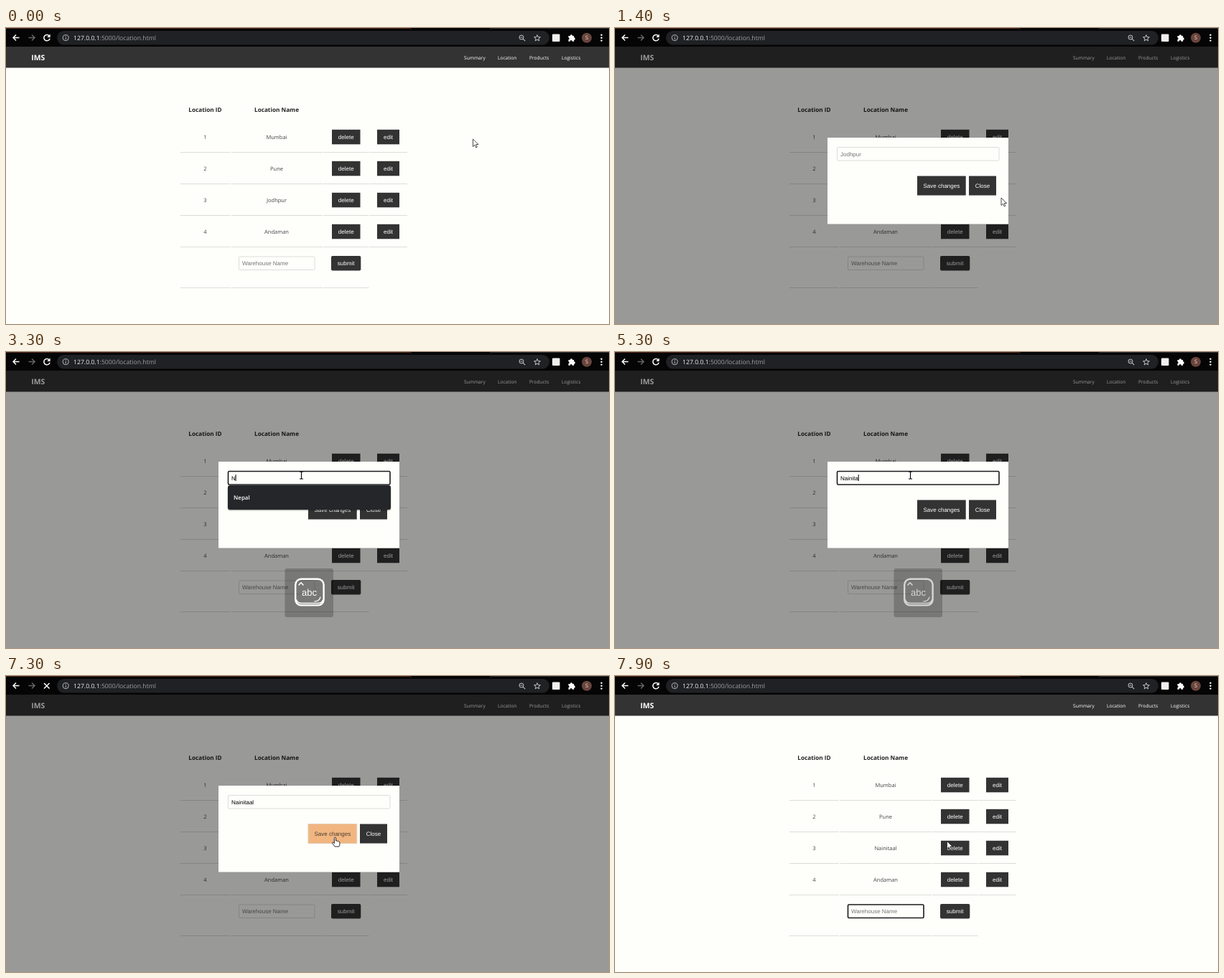
These frames come from a looping animation (840 px wide and 413 px high, 8 s). An HTML page:

```html
<!DOCTYPE html>
<html lang="en">
<head>
<meta charset="utf-8">
<title>Locations</title>
<style>
  html, body { margin: 0; width: 100%; height: 100%; overflow: hidden; background: #fefffb; }
  svg { display: block; width: 840px; height: 413px; }
  text { font-family: "Open Sans", "Noto Sans", sans-serif; text-rendering: geometricPrecision; }
  .ui { font-family: "Liberation Sans", Arial, sans-serif; font-size: 8px; }
  .mid { text-anchor: middle; }
  .cell { font-size: 7.5px; fill: #444; }
  .head { font-size: 8.2px; font-weight: 700; fill: #222; }
  .nav { font-size: 6.65px; fill: #fff; }
  .btn rect { fill: #333; }
  .btn text { fill: #fff; }
  .btn.hot rect { fill: #f1b680; stroke: #e6cdb2; stroke-width: 1; }
  .btn.hot text { fill: #4a3c30; }
  .field rect { fill: #fefffb; stroke: #dcdcd9; stroke-width: 1; }
  .field.focus rect { stroke: #1a1a1a; stroke-width: 1.6; }
  .hint { fill: #757575; }
  .line { fill: none; stroke: #fff; stroke-width: 1.5; }
</style>
</head>
<body>
<svg id="stage" viewBox="0 0 840 413">
  <g id="page"></g>
  <g id="dialog">
    <rect y="26" width="840" height="387" fill="#000" opacity=".4"/>
    <rect x="296" y="153" width="252" height="120.5" fill="#fefffb"/>
    <g id="dialogParts"></g>
    <rect id="caret" y="171" width="1" height="9" fill="#000"/>
    <g id="suggest">
      <rect x="308.5" y="187" width="228" height="34.5" rx="4" fill="#000" opacity=".25"/>
      <rect x="309" y="186" width="227" height="34" rx="3" fill="#242629"/>
      <text x="317" y="206" font-size="8" font-weight="600" fill="#fff">Nepal</text>
    </g>
  </g>
  <g id="caps">
    <rect x="388.5" y="302" width="67.5" height="68" rx="3" fill="#000" opacity=".22"/>
    <g id="capsIcon" fill="none" stroke="#fff" stroke-width="2.4" stroke-linecap="round">
      <rect x="403.2" y="316.8" width="39.4" height="36.6" rx="8"/>
      <path d="M404.5 346q1.500 4.500 7 4.500h23q6 0 7-4.500" stroke-width="1.600"/>
      <path d="M408 325l3-3.200 3 3.200" stroke-width="1.600"/>
      <path d="M429.500 348q7 0 8.500-6" stroke-width="1.200"/>
      <text class="ui mid" x="422.500" y="339.600" style="font-size:13px" fill="#fff" stroke="none">abc</text>
    </g>
  </g>
  <g id="bar">
    <rect width="840" height="26" fill="#050505"/>
    <path d="M0 .5H560q4 0 5 1.500" fill="none" stroke="#5b2a1b"/>
    <path d="M674 1.500q1-1 4-1H840" fill="none" stroke="#343434"/>
    <rect x="71" y="4" width="686" height="19.500" rx="9.700" fill="#202124"/>
    <path class="line" d="M18.500 13.500H10.500M14 9.500l-4 4 4 4"/>
    <path class="line" d="M31.500 13.500H39.500M36 9.500l4 4-4 4" style="stroke:#666"/>
    <g id="reload">
      <path class="line" d="M60.300 11a4.200 4.200 0 1 0 .8 3.600"/>
      <path d="M61.600 8.600v4.400h-4.400z" fill="#fff"/>
    </g>
    <path id="stop" class="line" d="M53 10l7.500 7.500M60.500 10l-7.500 7.500"/>
    <circle cx="83.200" cy="13.700" r="4" fill="none" stroke="#b8bbbf"/>
    <path d="M83.200 13v3M83.200 11v1.100" stroke="#b8bbbf"/>
    <text x="94" y="17" font-size="8.660" fill="#9aa0a6"><tspan fill="#f1f3f4">127.0.0.1</tspan>:5000/location.html</text>
    <g fill="none" stroke="#c4c7ca">
      <circle cx="718" cy="13" r="3"/>
      <path d="M720.200 15.200l3 3M716.500 13h3" stroke-width="1.100"/>
      <path id="star"/>
    </g>
    <rect x="761" y="8.500" width="10.500" height="10.500" rx="1" fill="#f1eeee"/>
    <path fill="#fff" d="M783.500 11h2.300a1.700 1.700 0 0 1 3.400 0h2v2.300a1.700 1.700 0 0 1 0 3.400v2h-2.300a1.600 1.600 0 0 0-3.200 0h-2.200v-2.400a1.600 1.600 0 0 0 0-3.100z"/>
    <circle cx="809" cy="13.700" r="7" fill="#6a453d"/>
    <text class="mid" x="809" y="16.400" font-size="7.500" fill="#f0e4df">S</text>
    <g fill="#fff"><circle cx="829.500" cy="9.800" r="1.200"/><circle cx="829.500" cy="13.700" r="1.200"/><circle cx="829.500" cy="17.600" r="1.200"/></g>
  </g>
  <g id="cursor">
    <path id="arrow" d="M0 0v10.500l2.500-2.300 1.700 3.700 1.700-.8-1.700-3.600h3.400z" fill="#fff" stroke="#222" stroke-width=".8"/>
    <path id="beam" d="M-2.500-5h2l.5.600.5-.6h2M0-4.500v9M-2.500 5h2l.5-.6.5.6h2" fill="none" stroke="#000" stroke-width="1.100"/>
    <path id="hand" d="M-1.100 7V.9q0-1.300 1.100-1.300t1.100 1.300V4.500q1.500-.6 2 .5 1.400-.4 1.800.6 1.500-.2 1.500 1.200V9.500q0 1.500-1 3H-.4L-3.700 8.300q-.6-1.100.3-1.600t2.300 1.300z" fill="#fff" stroke="#111" stroke-width=".9"/>
  </g>
</svg>
<script>
const $ = id => document.getElementById(id);
const LOOP = 8000, STEP = 100;
const OPEN = 1400, FOCUS = 2500, BLUR = 7000, RELOADED = 7600;

const text = (x, y, s, cls, id = "") => `<text id="${id}" class="${cls}" x="${x}" y="${y}">${s}</text>`;
const rule = (x1, x2, y) => `<rect x="${x1}" y="${y}" width="${x2 - x1}" height="1" fill="#dcdcd9"/>`;
const button = (x, y, w, h, label, id = "", rx = 0) =>
  `<g class="btn" id="${id}"><rect x="${x}" y="${y}" width="${w}" height="${h}" rx="${rx}"/>` +
  text(x + w / 2, y + h / 2 + 2.7, label, "ui mid") + `</g>`;
const field = (x, y, w, h, label, id) =>
  `<g class="field" id="${id}"><rect x="${x}" y="${y}" width="${w}" height="${h}" rx="1.5"/>` +
  text(x + 4.5, y + h / 2 + 2.8, label, "ui hint", id + "Text") + `</g>`;

const columns = [[243, 312], [313.5, 441], [442, 505.5], [506.5, 559]];
const rules = (y, count = 4) => columns.slice(0, count).map(c => rule(...c, y)).join("");

$("page").innerHTML =
  `<rect width="840" height="413" fill="#fefffb"/><rect y="26" width="840" height="29.5" fill="#333"/>` +
  `<text x="35.300" y="45" font-size="10.400" font-weight="700" fill="#fff">IMS</text>` +
  [[638, "Summary"], [685, "Location"], [729, "Products"], [774, "Logistics"]]
    .map(([x, s]) => text(x, 43.6, s, "nav")).join("") +
  text(277.5, 116.5, "Location ID", "head mid") + text(377, 116.5, "Location Name", "head mid") +
  ["Mumbai", "Pune", "Jodhpur", "Andaman"].map((name, i) => {
    const y = 152 + 44 * i;
    return text(277.5, y + 3, i + 1, "cell mid") + text(377, y + 3, name, "cell mid", "name" + i) +
      button(454, y - 10.2, 39.5, 20.5, "delete") +
      button(517, y - 10.2, 31, 20.5, "edit", "edit" + i) + rules(y + 21);
  }).join("") +
  field(324.5, 319, 105.5, 18.5, "Warehouse Name", "warehouse") +
  button(453, 318, 41.3, 20.5, "submit", "", 2) + rules(362, 3);

$("dialogParts").innerHTML =
  field(309.5, 166.5, 225.5, 18.5, "Jodhpur", "place") +
  button(421, 206.5, 67.7, 27, "Save changes", "save") + button(493, 206.5, 38, 27, "Close");

$("star").setAttribute("d", "M" + Array.from({ length: 10 }, (_, i) => {
  const a = i * Math.PI / 5, r = i % 2 ? 2 : 4.6;
  return (740 + r * Math.sin(a)).toFixed(1) + " " + (14.2 - r * Math.cos(a)).toFixed(1);
}).join("L") + "Z");

// Time, x, y of the pointer
const path = [
  [0, 650.5, 155], [200, 650.5, 155], [700, 590, 272], [1100, 538, 237], [1700, 538, 237],
  [2300, 411.5, 172], [6300, 411.5, 172], [6800, 458.5, 225.5], [7400, 458.5, 225.5], [7700, 462.5, 230.5]
];
const word = "Nainitaal";
const keys = [3200, 3600, 4000, 4400, 4700, 5000, 5200, 5600, 5900];

const ramp = (t, a, b) => Math.min(1, Math.max(0, (t - a) / (b - a)));
const ease = u => u * u * (3 - 2 * u);
const show = (id, on) => { $(id).style.display = on ? "" : "none"; };
const inside = (x, y, l, t, r, b) => x >= l && x <= r && y >= t && y <= b;

function pointer(t) {
  const i = path.findLastIndex(p => p[0] <= t);
  const a = path[i], b = path[i + 1] || a;
  const u = a === b ? 0 : ease(ramp(t, a[0], b[0]));
  return [a[1] + (b[1] - a[1]) * u, a[2] + (b[2] - a[2]) * u];
}

function draw(t) {
  const [x, y] = pointer(t);
  const open = t >= OPEN && t < RELOADED, done = t >= RELOADED;
  const focus = t >= FOCUS && t < BLUR;
  const typed = keys.filter(k => k <= t).length;
  const overField = open && inside(x, y, 309, 166, 535, 185);
  const overSave = open && inside(x, y, 421, 206, 489, 234);

  $("name2").textContent = done ? word : "Jodhpur";
  $("warehouse").classList.toggle("focus", done);
  $("edit2").classList.toggle("hot", t < OPEN && inside(x, y, 517, 230, 548, 250));
  $("save").classList.toggle("hot", overSave);

  show("dialog", open);
  $("place").classList.toggle("focus", focus);
  const label = $("placeText");
  label.textContent = typed ? word.slice(0, typed) : "Jodhpur";
  label.setAttribute("class", typed ? "ui" : "ui hint");
  const last = typed ? keys[typed - 1] : FOCUS;
  show("caret", focus && (t - last) % 1000 < 500);
  $("caret").setAttribute("x", 313.8 + (open && typed ? label.getComputedTextLength() : 0));
  show("suggest", t >= keys[0] && t < keys[1]);

  $("caps").style.opacity = ramp(t, 2600, 2900) * (1 - ramp(t, 5400, 6200));
  $("capsIcon").style.opacity = 1 - .3 * ramp(t, 5000, 5300);

  const loading = t >= BLUR && t < RELOADED;
  show("stop", loading);
  show("reload", !loading);

  $("cursor").setAttribute("transform", `translate(${x} ${y})`);
  show("beam", overField);
  show("hand", overSave);
  show("arrow", !overField && !overSave);
}

const start = performance.now();
function tick(now) {
  const t = Math.max(0, now - start) % LOOP;
  draw(Math.floor(t / STEP) * STEP);
  requestAnimationFrame(tick);
}
draw(0);
requestAnimationFrame(tick);
</script>
</body>
</html>
```
